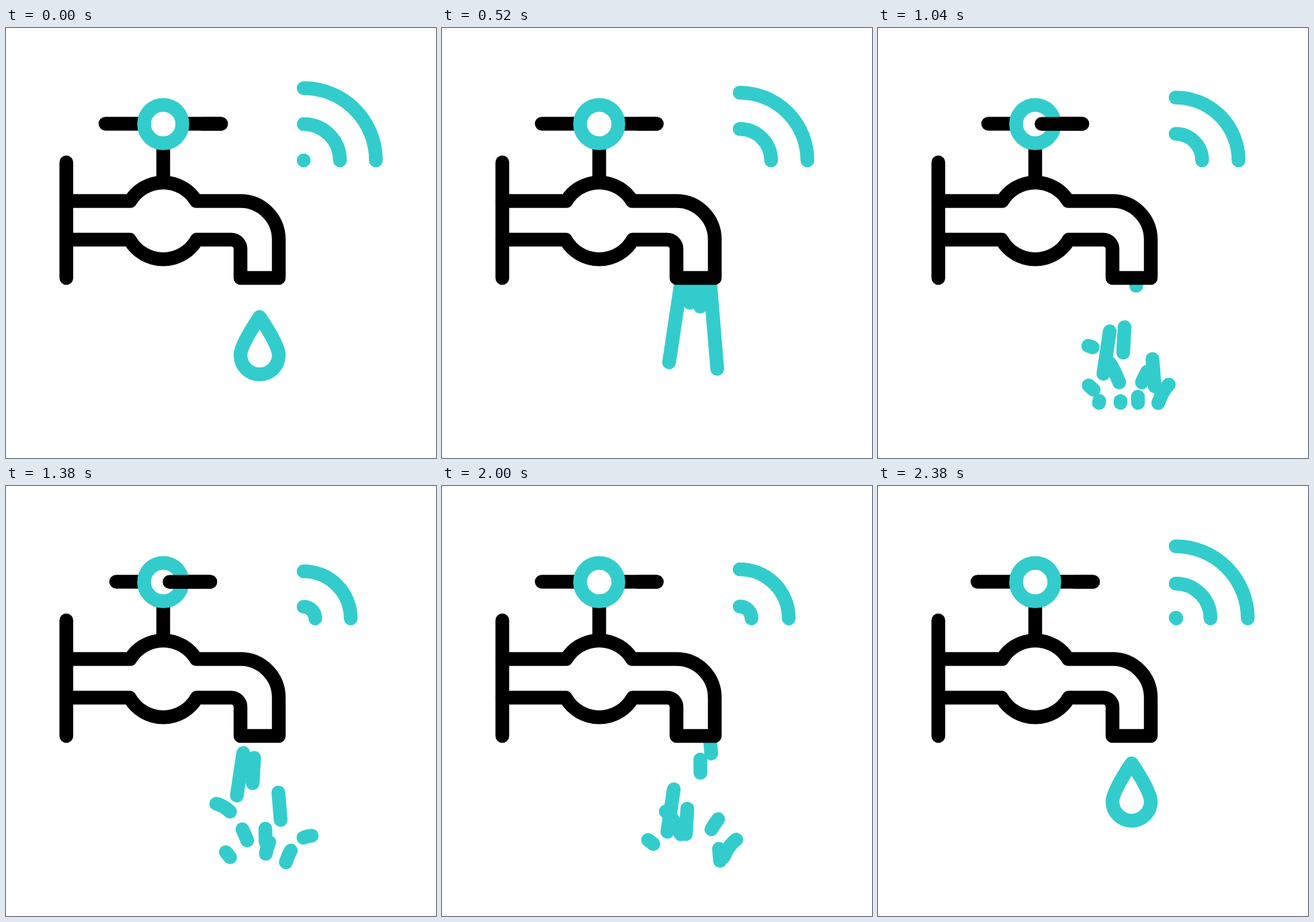
An HTML page with a canvas for the animation above (2400 ms loop, 640x640 px).

```html
<!DOCTYPE html>
<html lang="en">
<head>
<meta charset="utf-8">
<title>Smart tap</title>
<style>
  html, body { margin: 0; width: 100%; height: 100%; overflow: hidden; background: #fff; }
  canvas { display: block; width: 640px; height: 640px; }
</style>
</head>
<body>
<canvas id="stage" width="640" height="640"></canvas>
<script>
const ctx = document.getElementById('stage').getContext('2d');
const LOOP = 2400, WATER_END = 2150;
const TEAL = '#33cccc', BLACK = '#000', WHITE = '#fff';

const body = new Path2D('M90 257.5H185A57.3 57.3 0 0 1 283 257.5H349A57 57.5 0 0 1 406 315V372H349V329A14 14 0 0 0 335 315H284A57.3 57.3 0 0 1 184 315H90');
const wall = new Path2D('M89.8 200V372');
const stem = new Path2D('M234 143V229');
const knob = new Path2D('M262.5 143A28.5 28.5 0 1 1 205.5 143A28.5 28.5 0 1 1 262.5 143Z');
const drop = new Path2D('M377.5 430C377.5 430 349 471 349 487A28.5 28.5 0 0 0 406 487C406 471 377.5 430 377.5 430Z');

// Dashes run along d at px/ms; `lead` is the first stroke's front and tail start times
const flow = (d, speed, len, start, period, lead) =>
  ({ path: new Path2D(d), speed, len, start, period, lead });

const flows = [
  flow('M356.9 372L328.9 558', .39, 64, 670, 480, [194, 565]),
  flow('M371 372L360.8 558', .417, 38, 773, 438, [431, 600]),
  flow('M384.3 372Q384.3 440 387 558', .43, 20, 582, 430, [420, 525]),
  flow('M398.5 372L413.8 558', .431, 41, 664, 425, [205, 560]),
  flow('M359 527.5Q341 480 313 473', .171, 41, 847, 428, [560, 648]),
  flow('M336 556Q317 529 285.5 515', .165, 10, 840, 454),
  flow('M386.5 548Q394 512 424.5 480', .215, 18, 856, 437),
  flow('M416.5 560Q429 522 455 520.5', .13, 32, 780, 454)
];

// Radio waves: birth times
const waves = [-1195, -600, 0, 602, 1188, 1804, 2369];

function stroke(path, color, width = 20.5) {
  ctx.strokeStyle = color;
  ctx.lineWidth = width;
  ctx.stroke(path);
}

function line(x1, x2, y) {
  stroke(new Path2D(`M${x1} ${y}H${x2}`), BLACK);
}

function ease(t, from, to) {
  const u = Math.min(1, Math.max(0, (t - from) / (to - from)));
  return u * u * (3 - 2 * u);
}

function drawDash(path, tail, front) {
  const a = Math.max(0, tail);
  if (front <= a) return;
  ctx.setLineDash([front - a, 2000]);
  ctx.lineDashOffset = -a;
  stroke(path, TEAL);
}

function drawWater(t) {
  for (const { path, speed, len, start, period, lead } of flows) {
    if (lead) drawDash(path, (t - lead[1]) * speed, (t - lead[0]) * speed);
    for (let born = start; born < t; born += period) {
      const front = (t - born) * speed;
      drawDash(path, front - len, front);
    }
  }
  ctx.setLineDash([]);
}

function drawDrop(t) {
  const s = t > 1200 ? t - LOOP : t;
  if (s < -210 || s > 70) return;
  ctx.save();
  ctx.translate(0, .88 * s + .0008 * s * s);
  stroke(drop, TEAL);
  ctx.restore();
}

function drawTap(t) {
  const turn = ease(t, 475, 925) - ease(t, 1595, 2045);
  const half = 86 - 16 * turn;
  ctx.fillStyle = WHITE;
  ctx.fill(body);
  stroke(stem, BLACK);
  stroke(body, BLACK);
  stroke(wall, BLACK);
  line(234 - half, 234 + half, 142.6);
  ctx.fill(knob);
  stroke(knob, TEAL);
  line(293.5 - 50 * turn, 234 + half, 142.8);
}

function drawWaves(t) {
  for (const born of waves) {
    const r = (t - born) * .09;
    if (r < 0 || r > 118) continue;
    const arc = new Path2D();
    arc.arc(443, 197, Math.max(r, .1), -Math.PI / 2, 0);
    stroke(arc, TEAL);
  }
}

function draw(t) {
  ctx.fillStyle = WHITE;
  ctx.fillRect(0, 0, 640, 640);
  ctx.lineCap = ctx.lineJoin = 'round';
  if (t < WATER_END) drawWater(t);
  drawDrop(t);
  drawTap(t);
  drawWaves(t);
}

let origin;
function tick(now) {
  origin ??= now;
  draw((now - origin) % LOOP);
  requestAnimationFrame(tick);
}
draw(0);
requestAnimationFrame(tick);
</script>
</body>
</html>
```
